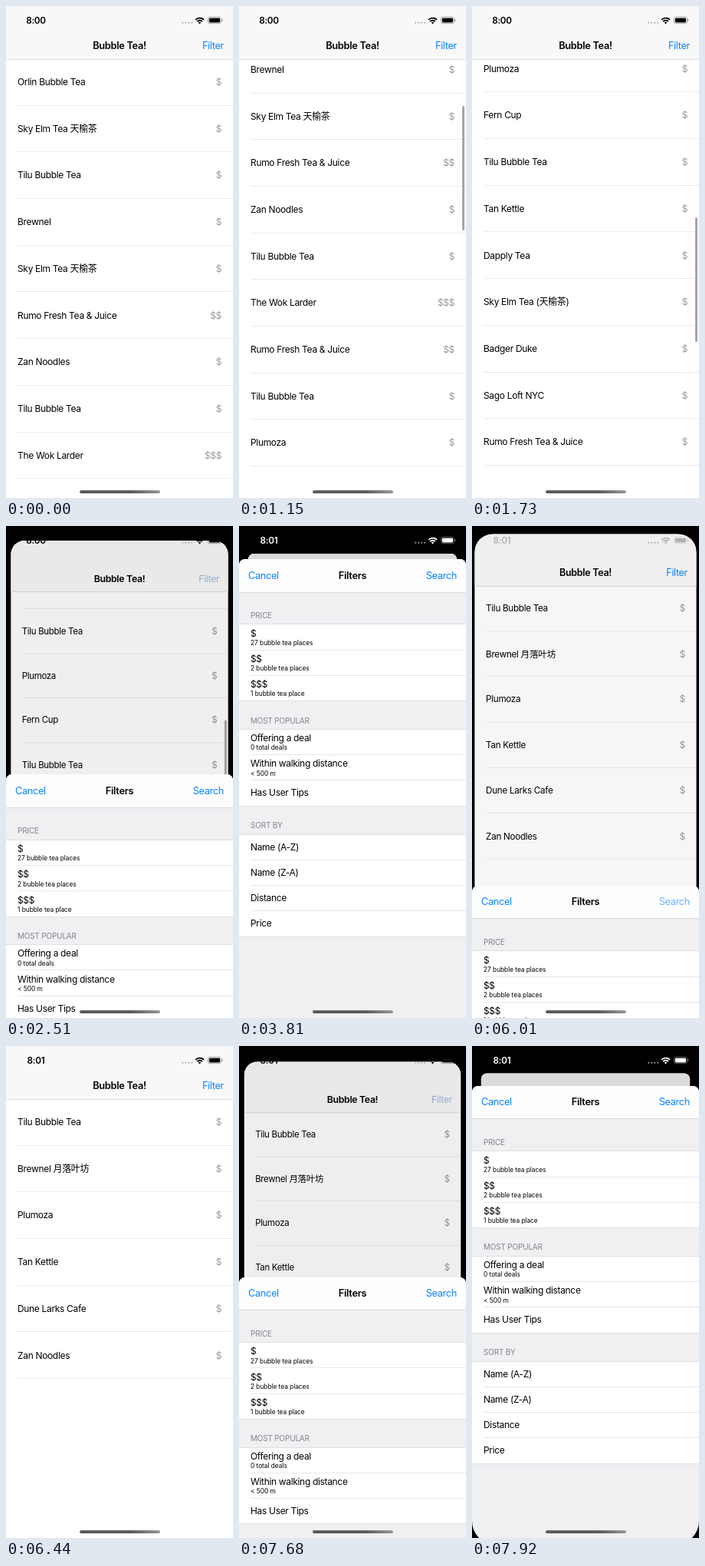
Write an HTML page that moves like this. It is 296 by 640 pixels and loops after 8 s.

```html
<!DOCTYPE html>
<html lang="en">
<head>
<meta charset="utf-8">
<style>
html, body { margin: 0; width: 100%; height: 100%; overflow: hidden; background: #000; }
#stage { position: relative; width: 296px; height: 640px; overflow: hidden; background: #000;
  font: 12px/20px Inter, "Noto Sans CJK SC", "Noto Sans CJK", sans-serif; letter-spacing: -.33px; color: #000; }
:where(#stage div, #stage svg) { position: absolute; top: 0; box-sizing: border-box; white-space: nowrap; }
svg { left: 0; }
#card { left: 0; width: 296px; height: 640px; background: #fff; overflow: hidden; transform-origin: 0 0; }
#nav { left: 0; width: 296px; height: 69.5px; background: #f8f8f8; border-bottom: 1px solid #dedede; }
#view { left: 0; top: 69px; width: 296px; height: 545.5px; overflow: hidden; }
.list { left: 0; width: 296px; }
.row { left: 15px; right: 0; height: 60.7px; line-height: 60.7px; border-bottom: 1px solid #ececec; }
.row b { position: absolute; right: 15px; font-weight: 400; color: #98989c; }
#thumb { left: 291.3px; width: 2.4px; height: 162px; border-radius: 2px; background: #a6a6a6; }
#dim { inset: 0; background: #000; }
.title { left: 0; width: 296px; text-align: center; font-weight: 600; font-size: 12.8px; letter-spacing: -.3px; }
.link { font-size: 12.8px; letter-spacing: -.36px; color: #0a84ff; }
#sheet { left: 0; width: 296px; height: 597px; background: #f0f0f3; overflow: hidden; }
#bar { left: 0; width: 296px; height: 43.5px; background: #fdfdfd; border-bottom: 1px solid #dadadd; }
.head { left: 15px; font-size: 10px; letter-spacing: -.2px; color: #85858a; }
.group { left: 0; width: 296px; background: #fff; border: solid #e0e0e3; border-width: 1px 0; }
.cell { left: 0; width: 296px; height: 33.3px; }
.cell + .cell::before { content: ""; position: absolute; left: 15px; right: 0; border-top: 1px solid #e8e8ea; }
.cell div { left: 15px; }
.cell .sub { font-size: 8.4px; letter-spacing: -.05px; }
#clock { left: 19px; top: 9px; width: 40px; text-align: center; font-weight: 600; font-size: 11.8px; letter-spacing: -.3px; }
#home { left: 95.5px; top: 630px; width: 105px; height: 4px; border-radius: 2px;
  background: linear-gradient(90deg, #5c5c5c 65%, #999); }
</style>
</head>
<body>
<div id="stage">
  <div id="card">
    <div id="view"><div class="list" id="all"></div><div class="list" id="some"></div></div>
    <div id="thumb"></div>
    <div id="nav">
      <div class="title" style="top:42px">Bubble Tea!</div>
      <div class="link" id="filter" style="top:42px;right:12px">Filter</div>
    </div>
    <div id="dim"></div>
  </div>
  <div id="sheet">
    <div id="bar">
      <div class="link" style="top:11.5px;left:12px">Cancel</div>
      <div class="title" style="top:11.5px">Filters</div>
      <div class="link" id="search" style="top:11.5px;right:12px">Search</div>
    </div>
  </div>
  <div id="status" style="left:0">
    <div id="clock"></div>
    <svg width="296" height="30" fill="none" stroke="currentColor">
      <path d="M230.3 21.7h13" stroke="#aaa" stroke-width="2" stroke-linecap="round" stroke-dasharray="0 4"/>
      <path d="M247 18a7.6 7.6 0 0 1 11 0M249.1 20.2a4.7 4.7 0 0 1 6.8 0" stroke-width="1.8"/>
      <path d="M252.5 23.4l-1.8-1.9a2.6 2.6 0 0 1 3.6 0z" fill="currentColor" stroke="none"/>
      <rect x="263.4" y="14.4" width="17" height="8.4" rx="2.4" stroke-opacity=".45" stroke-width=".8"/>
      <rect x="264.8" y="15.8" width="14.2" height="5.6" rx="1.3" fill="currentColor" stroke="none"/>
      <path d="M281.8 17.2v2.8" stroke-opacity=".5"/>
    </svg>
  </div>
  <div id="home"></div>
</div>
<script>
const $ = id => document.getElementById(id);
const clamp = x => Math.min(1, Math.max(0, x));
const smooth = x => { x = clamp(x); return x * x * (3 - 2 * x); };

const TILU = "Tilu Bubble Tea", ELM = "Sky Elm Tea 天榆茶", RUMO = "Rumo Fresh Tea & Juice",
  ZAN = "Zan Noodles", PLUM = "Plumoza", TAN = "Tan Kettle", WOK = "The Wok Larder";
const places = ["Orlin Bubble Tea", ELM, TILU, "Brewnel", ELM, RUMO, ZAN, TILU, WOK, RUMO,
  TILU, PLUM, "Fern Cup", TILU, TAN, "Dapply Tea", "Sky Elm Tea (天榆茶)", "Badger Duke",
  "Sago Loft NYC", RUMO, TILU, ZAN, TAN, PLUM, ELM, TILU, "Brewnel", RUMO, ZAN, TAN];
const matches = [TILU, "Brewnel 月落叶坊", PLUM, TAN, "Dune Larks Cafe", ZAN];
const ROW = 60.7, price = name => name === WOK ? "$$$" : name === RUMO ? "$$" : "$";

function fillList(el, names) {
  el.innerHTML = names.map((name, i) => {
    // The last juice bars in the list are cheap ones
    const cost = i > 9 ? "$" : price(name);
    return `<div class="row" style="top:${i * ROW}px">${name.replace("&", "&amp;")}<b>${cost}</b></div>`;
  }).join("");
}
fillList($("all"), places);
fillList($("some"), matches);

const CELL = 33.3;
function addGroup(title, top, cells) {
  const rows = cells.map(([text, sub = ""], i) =>
    `<div class="cell" style="top:${i * CELL - 1}px">
      <div style="top:${sub ? 2.3 : 7}px">${text}</div>
      <div class="sub" style="top:14.6px">${sub}</div></div>`);
  $("sheet").insertAdjacentHTML("beforeend",
    `<div class="head" style="top:${top - 21.3}px">${title}</div>
     <div class="group" style="top:${top}px;height:${cells.length * CELL + 1}px">${rows.join("")}</div>`);
}
addGroup("PRICE", 84.3, [["$", "27 bubble tea places"], ["$$", "2 bubble tea places"], ["$$$", "1 bubble tea place"]]);
addGroup("MOST POPULAR", 220.8, [["Offering a deal", "0 total deals"], ["Within walking distance", "&lt; 500 m"], ["Has User Tips"]]);
addGroup("SORT BY", 357.6, [["Name (A-Z)"], ["Name (Z-A)"], ["Distance"], ["Price"]]);
const deal = document.querySelectorAll(".cell")[3];

const ticks = [0, 920, 1035, 1150, 1265, 1380, 1495, 1610, 1730, 1840, 1950, 2060, 2170, 2285, 2400,
  2510, 2750, 2940, 3810, 4960, 5740, 5870, 6010, 6270, 6440, 7440, 7680, 7800, 7920];
const OPEN = [2456, 7620], CLOSE = 5977;

function sheetProgress(t) {
  if (t >= 6440 && t < OPEN[1] || t < OPEN[0]) return 0;
  if (t >= 2940 && t < 5740) return 1;
  if (t >= 5740 && t < 6440) return 1 / (1 + Math.exp((t - CLOSE) / 36.5));
  return 1 - Math.exp(-.014 * (t - OPEN[t < 5000 ? 0 : 1]));
}

function scrollAt(t) {
  if (t < 920) return 0;
  return 685 * smooth((t - 830) / 900) - 102 * smooth((t - 1730) / 560);
}

function statusLight(t) {
  if (t >= 5740 && t < OPEN[1]) return clamp((6310 - t) / 430);
  return clamp((t - OPEN[t < 5000 ? 0 : 1] - 50) / 190);
}

function draw(t) {
  const p = sheetProgress(t), moving = p > 0 && p < 1, scroll = scrollAt(t);
  const filtered = t >= 5740;

  $("card").style.transform = `translate(${12 * p}px, ${36 * p}px) scale(${1 - .081 * p})`;
  $("card").style.borderRadius = p > .001 ? `${31 - 23 * p}px` : 0;
  $("dim").style.opacity = .12 * p;
  $("all").style.display = filtered ? "none" : "";
  $("some").style.display = filtered ? "" : "none";
  $("all").style.top = `${-scroll}px`;
  $("thumb").style.display = t >= 920 && !filtered ? "" : "none";
  $("thumb").style.top = `${71 + scroll * .2975}px`;
  const pressed = t >= 2400 && t < 5740 || t >= 7440;
  $("filter").style.color = !pressed ? "" : p > 0 ? "#9abbdc" : "#b8d8fc";

  $("sheet").style.display = p > 0 ? "" : "none";
  $("sheet").style.top = `${640 - 597 * p}px`;
  $("sheet").style.borderRadius = moving ? "8px 8px 31px 31px" : "8px 8px 0 0";
  $("search").style.opacity = t >= 5740 && t < 6440 ? .6 : 1;
  deal.style.background = t >= 4960 && t < 6440 ? "#d1d1d6" : "";

  const v = Math.round(255 * statusLight(t));
  $("status").style.color = `rgb(${v},${v},${v})`;
  $("clock").textContent = t < 3810 ? "8:00" : "8:01";
}

const start = performance.now();
function frame() {
  const now = (performance.now() - start) % 8000;
  draw(ticks.findLast(tick => tick <= now));
  requestAnimationFrame(frame);
}
frame();
</script>
</body>
</html>
```
